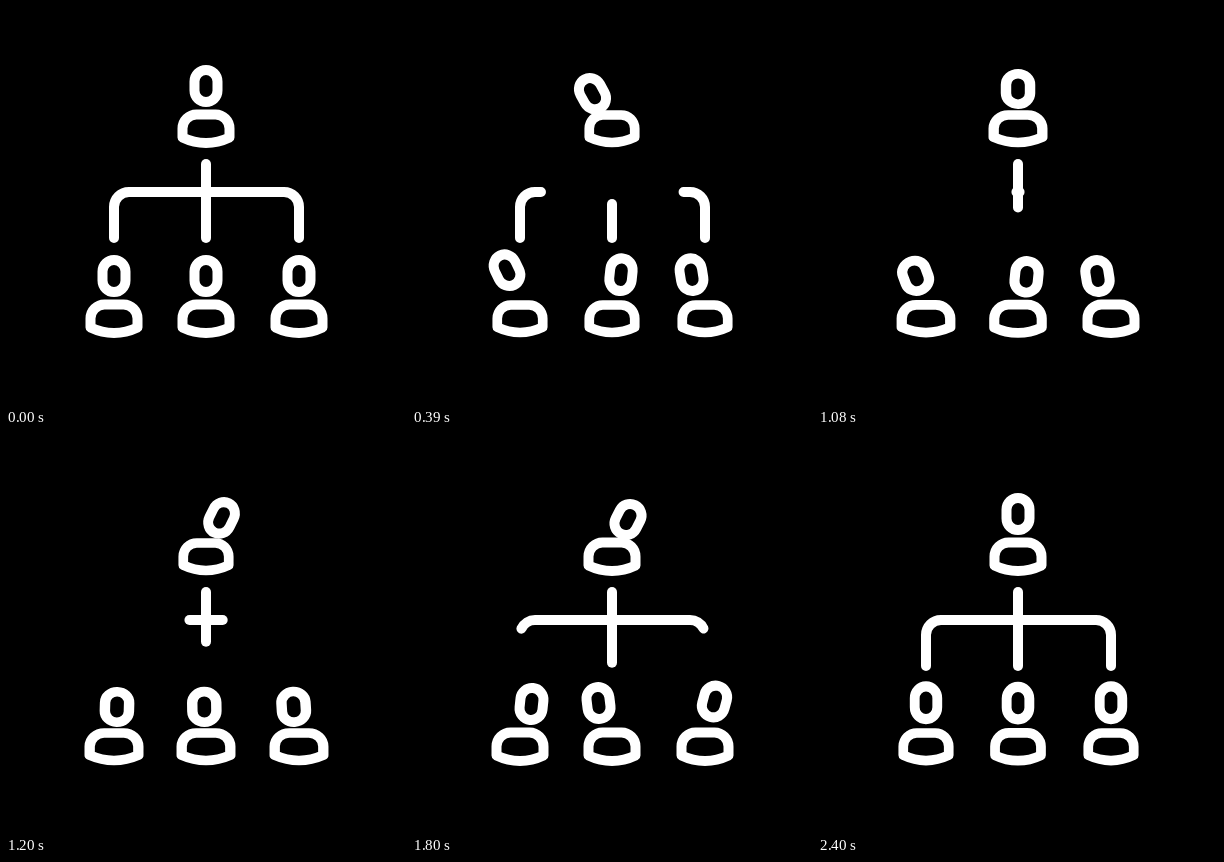
Write an HTML page with a canvas that moves like this. It is 400 px wide and 400 px high and loops after 2630 ms.

```html
<!DOCTYPE html>
<html>
<head>
<meta charset="utf-8">
<style>
html, body { margin: 0; height: 100%; overflow: hidden; background: #000; }
canvas { display: block; width: 100vmin; height: 100vmin; }
</style>
</head>
<body>
<canvas id="stage" width="400" height="400"></canvas>
<script>
const ctx = document.getElementById('stage').getContext('2d');
const LOOP = 2630, SWING = 300;

const head = new Path2D('M-11.5 -4.5A11.5 11.5 0 0 1 11.5 -4.5V4.5A11.5 11.5 0 0 1 -11.5 4.5Z');
const torso = new Path2D('M-23.5 8.5V-.5A14 14 0 0 1 -9.5 -14.5H9.5A14 14 0 0 1 23.5 -.5V8.5Q12 14 0 14Q-12 14 -23.5 8.5Z');
const trunk = { path: new Path2D('M200 158V232'), length: 74 };
const branches = [
  { path: new Path2D('M200 186H123A15 15 0 0 0 108 201V232'), length: 131.6 },
  { path: new Path2D('M200 186H278A15 15 0 0 1 293 201V232'), length: 132.6 }
];

// Each lean is [dx, dy, degrees]; starts are the times of the three swings.
const people = [
  { x: 200, y: 80, leans: [[-19.5, 9, -29], [16, 5.5, 27]], starts: [0, 921, 1881] },
  { x: 108, y: 270, leans: [[-13, -4.5, -26], [11.5, 0, 6]], starts: [30, 1020, 1971] },
  { x: 200, y: 270, leans: [[9, 0, 6], [-13.5, -1, -7]], starts: [20, 1056, 1941] },
  { x: 293, y: 270, leans: [[-13.5, 0, -9], [9.5, -2.5, 15]], starts: [30, 1080, 1971] }
];

// Body squash after the start of a swing: [ms, amount].
const squashKeys = [[0, 0], [70, .033], [190, .035], [275, -.033], [425, -.033], [520, 0]];

const clamp = u => Math.min(1, Math.max(0, u));
const smooth = u => u * u * (3 - 2 * u);
const span = (t, from, to) => clamp((t - from) / (to - from));
const settle = u => u * (1.2 + .6 * u - .8 * u * u);

function squashAt(ms) {
  const i = squashKeys.findIndex(key => key[0] > ms);
  if (i < 1) return 0;
  const [t0, a] = squashKeys[i - 1], [t1, b] = squashKeys[i];
  return a + (b - a) * smooth(span(ms, t0, t1));
}

function drawShape(path, x, y, degrees, sx, sy) {
  ctx.save();
  ctx.translate(x, y);
  ctx.rotate(degrees * Math.PI / 180);
  ctx.scale(sx, sy);
  ctx.stroke(path);
  ctx.restore();
}

function drawPerson({ x, y, leans, starts }, t) {
  const stops = [0, leans[0][0], leans[1][0], 0];
  let dx = 0, squash = 0;
  starts.forEach((start, i) => {
    dx += (stops[i + 1] - stops[i]) * smooth(span(t, start, start + SWING));
    squash += squashAt(t - start);
  });
  const lean = leans.find(l => l[0] * dx > 0) || leans[0];
  const f = dx / lean[0];
  const q = squash * (squash > 0 ? 1.3 : .6);
  drawShape(torso, x, y + 43, 0, 1 + squash, 1 - Math.abs(squash));
  drawShape(head, x + dx, y + f * f * lean[1] + 65 * q, f * lean[2], 1 + q, 1 - q);
}

function drawPart({ path, length }, from, to) {
  if (to <= from) return;
  ctx.setLineDash([(to - from) * length + .5, 2 * length]);
  ctx.lineDashOffset = -from * length;
  ctx.stroke(path);
  ctx.setLineDash([]);
}

function draw(now) {
  const t = now % LOOP;
  ctx.fillStyle = '#000';
  ctx.fillRect(0, 0, 400, 400);
  ctx.strokeStyle = '#fff';
  ctx.lineWidth = 10;
  ctx.lineCap = ctx.lineJoin = 'round';

  const erased = settle(span(t, 0, 950));
  const trunkDrawn = 1 - (1 - span(t, 480, 2190)) ** 2;
  const branchDrawn = settle(span(t, 1072, 2395));
  drawPart(trunk, erased, 1);
  drawPart(trunk, 0, trunkDrawn);
  for (const branch of branches) {
    drawPart(branch, erased, 1);
    drawPart(branch, 0, branchDrawn);
  }
  for (const person of people) drawPerson(person, t);
}

function tick() {
  draw(performance.now());
  requestAnimationFrame(tick);
}
tick();
</script>
</body>
</html>
```
